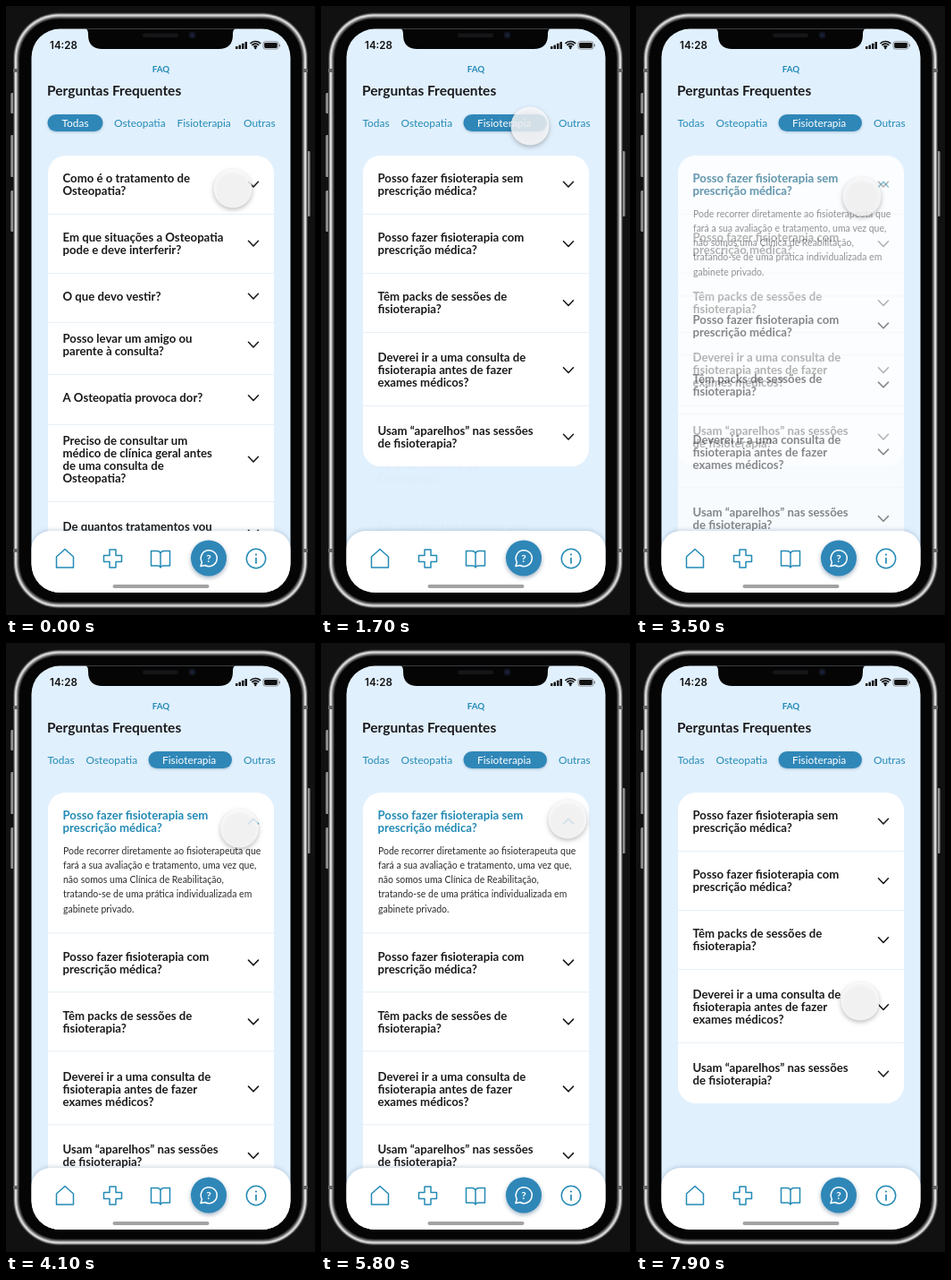
Animation, 346 px wide and 680 px high, one loop 8000 ms. Source, as an HTML page with a canvas:

```html
<!DOCTYPE html>
<html lang="pt">
<head>
<meta charset="utf-8">
<style>
html, body { margin: 0; width: 100%; height: 100%; overflow: hidden; background: #111; }
canvas { display: block; width: 346px; height: 680px; }
</style>
</head>
<body>
<canvas id="stage"></canvas>
<script>
const W = 346, H = 680, LOOP = 8000, FADE = 900;
const TEAL = '#238ab5', BLUE = '#2f87b8', INK = '#1a1a1c', SKY = '#e1f0fd';
const canvas = document.getElementById('stage');
const g = canvas.getContext('2d');
const ratio = window.devicePixelRatio || 1;
canvas.width = W * ratio;
canvas.height = H * ratio;

// Each item: vertical centre of the question, then its lines
const ALL = {
  bottom: 750, dividers: [232, 298, 353, 411, 467, 553],
  items: [
    [199, 'Como é o tratamento de', 'Osteopatia?'],
    [265, 'Em que situações a Osteopatia', 'pode e deve interferir?'],
    [324, 'O que devo vestir?'],
    [378, 'Posso levar um amigo ou', 'parente à consulta?'],
    [437.5, 'A Osteopatia provoca dor?'],
    [506, 'Preciso de consultar um', 'médico de clínica geral antes', 'de uma consulta de', 'Osteopatia?'],
    [588, 'De quantos tratamentos vou', 'precisar?']
  ]
};
const QUESTIONS = [
  ['Posso fazer fisioterapia sem', 'prescrição médica?'],
  ['Posso fazer fisioterapia com', 'prescrição médica?'],
  ['Têm packs de sessões de', 'fisioterapia?'],
  ['Deverei ir a uma consulta de', 'fisioterapia antes de fazer', 'exames médicos?'],
  ['Usam “aparelhos” nas sessões', 'de fisioterapia?']
];
const ANSWER = [
  'Pode recorrer diretamente ao fisioterapeuta que',
  'fará a sua avaliação e tratamento, uma vez que,',
  'não somos uma Clínica de Reabilitação,',
  'tratando-se de uma prática individualizada em',
  'gabinete privado.'
];
const physio = (shift, bottom) => ({
  bottom, open: shift > 0,
  dividers: [232, 298, 364, 446].map(y => y + shift),
  items: [199, 265.5, 331.5, 406.5, 481].map((y, i) => [y + (i ? shift : 0), ...QUESTIONS[i]])
});
const CLOSED = physio(0, 514), OPEN = physio(91.3, 750);

const CHANGES = [
  { at: 815, from: ALL, to: CLOSED },
  { at: 3225, from: CLOSED, to: OPEN },
  { at: 5960, from: OPEN, to: CLOSED }
];
// time, x, y
const POINTER = [
  [0, 254, 204], [800, 234, 134], [1800, 234, 134], [2700, 253, 213],
  [3500, 253, 213], [4900, 276, 197], [6700, 276, 197], [7750, 251, 400], [8000, 251, 400]
];

const lerp = (a, b, t) => a + (b - a) * t;
const clamp = t => Math.max(0, Math.min(1, t));
const easeOut = t => 1 - (1 - t) ** 2;
const easeInOut = t => t < .5 ? 2 * t * t : 1 - 2 * (1 - t) ** 2;

function box(x, y, w, h, r) {
  g.beginPath();
  g.roundRect(x, y, w, h, r);
}
function fillBox(x, y, w, h, r, color) {
  box(x, y, w, h, r);
  g.fillStyle = color;
  g.fill();
}
function strokeBox(x, y, w, h, r, color, width) {
  box(x, y, w, h, r);
  stroke(color, width);
}
function disc(x, y, r, color) {
  g.beginPath();
  g.arc(x, y, r, 0, 7);
  g.fillStyle = color;
  g.fill();
}
function stroke(color, width) {
  g.strokeStyle = color;
  g.lineWidth = width;
  g.stroke();
}
function path(d, x, y, color, width) {
  g.save();
  g.translate(x, y);
  g.lineCap = g.lineJoin = 'round';
  g.strokeStyle = color;
  g.lineWidth = width;
  g.stroke(new Path2D(d));
  g.restore();
}
function text(str, x, y, font, color, align = 'left') {
  g.font = font;
  g.fillStyle = color;
  g.textAlign = align;
  g.fillText(str, x, y);
}
function withAlpha(alpha, draw) {
  if (alpha <= 0) return;
  g.save();
  g.globalAlpha = alpha;
  draw();
  g.restore();
}
function withShadow(color, blur, dy, draw) {
  g.save();
  g.shadowColor = color;
  g.shadowBlur = blur * ratio;
  g.shadowOffsetY = dy * ratio;
  draw();
  g.restore();
}

function drawBody() {
  g.fillStyle = '#111';
  g.fillRect(0, 0, W, H);
  for (const [x, y, h] of [[5, 97, 23], [5, 144, 47], [5, 206, 46], [337, 162, 73]]) {
    const shade = g.createLinearGradient(x, 0, x + 4, 0);
    shade.addColorStop(0, '#555');
    shade.addColorStop(.5, '#aaa');
    shade.addColorStop(1, '#333');
    fillBox(x, y, 4, h, 1.5, shade);
  }
  // Metal rim: dark edge, bright band, then a falloff into the bezel
  const rim = ['#3a3a3a', '#8c8c8c', '#dedede', '#d0d0d0', '#909090', '#585858', '#2c2c2c', '#050505'];
  rim.forEach((color, i) => fillBox(8 + i, 7.5 + i, 330 - 2 * i, 665 - 2 * i, 51 - i, color));
  for (const y of [70, 606]) {
    g.fillStyle = '#666';
    g.fillRect(8, y, 5, 4);
    g.fillRect(333, y, 5, 4);
  }
}

function drawStatus() {
  g.fillStyle = '#050505';
  g.fill(new Path2D('M86 24H260Q254 25 254 31V32Q254 48 238 48H108Q92 48 92 32V31Q92 25 86 24Z'));
  fillBox(153, 30.5, 40, 4.5, 2.3, '#161618');
  disc(208.5, 32.5, 4, '#11141f');
  disc(208.5, 32.5, 1.7, '#1c2440');

  text('14:28', 49, 47.8, '600 11.6px Inter, sans-serif', '#111');
  [3, 4.5, 6.3, 8].forEach((h, i) => fillBox(257 + i * 3.5, 48 - h, 2.5, h, .6, '#111'));
  [2.6, 5.4, 8].forEach(r => {
    g.beginPath();
    g.arc(279.3, 47.5, r, -Math.PI * .76, -Math.PI * .24);
    stroke('#111', 1.7);
  });
  disc(279.3, 47, 1.2, '#111');
  strokeBox(288, 39.7, 17, 8.4, 2.4, '#777', .8);
  fillBox(289.2, 40.9, 14.6, 6, 1.4, '#111');
  fillBox(305.8, 42.4, 1.2, 3, .6, '#777');
}

function drawTabs(p) {
  text('FAQ', 173.5, 73.8, 'bold 9.8px Lato, sans-serif', TEAL, 'center');
  text('Perguntas Frequentes', 46, 100, 'bold 15.5px Lato, sans-serif', INK);
  withShadow('rgba(30,80,120,.3)', 3, 1, () =>
    fillBox(lerp(46.5, 159.5, p), 121, lerp(62, 93.5, p), 19, 9.5, BLUE));
  const label = (str, x, lit) => {
    const font = '11.9px Lato, sans-serif';
    withAlpha(1 - lit, () => text(str, x, 135, font, TEAL));
    withAlpha(lit, () => text(str, x, 135, font, '#fff'));
  };
  label('Todas', lerp(62.5, 46.5, p), 1 - p);
  label('Osteopatia', lerp(121, 89.5, p), 0);
  label('Fisioterapia', lerp(191.5, 175, p), p);
  label('Outras', 266, 0);
}

function drawCard(bottom) {
  fillBox(47, 167, 253, bottom - 167, 20, '#fff');
}

function drawList(list) {
  drawCard(list.bottom);
  g.fillStyle = '#e6eff6';
  for (const y of list.dividers) g.fillRect(47, y, 253, 1);
  list.items.forEach(([cy, ...lines], i) => {
    const active = list.open && i === 0;
    const color = active ? TEAL : INK;
    lines.forEach((line, n) => text(line, 63.5,
      cy + (n - (lines.length - 1) / 2) * 14 + 4.8, 'bold 13.2px Lato, sans-serif', color));
    path(active ? 'M-5.5 3L0 -2.7L5.5 3' : 'M-5.5 -2.7L0 3L5.5 -2.7', 277, cy, color, 1.6);
  });
  if (list.open) ANSWER.forEach((line, n) =>
    text(line, 64, 235.5 + n * 16.3, '10.5px Lato, sans-serif', '#2c2c2e'));
}

function drawLists(time) {
  let current = ALL;
  for (const { at, from, to } of CHANGES) {
    const t = (time - at) / FADE;
    if (t >= 1) current = to;
    else if (t > 0) {
      const p = easeOut(t);
      withAlpha(p, () => drawCard(lerp(from.bottom, to.bottom, p)));
      withAlpha(1 - t, () => drawList(from));
      withAlpha(p, () => drawList(to));
      return;
    }
  }
  drawList(current);
}

function drawNav() {
  withShadow('rgba(60,100,140,.28)', 5, -1, () => fillBox(28, 586, 291, 80, [22, 22, 0, 0], '#fff'));
  path('M-9.5 -2L0 -10.5L9.5 -2V10H-9.5Z', 66, 617, TEAL, 1.5);
  path('M-3.5 -10H3.5V-3.5H10V3.5H3.5V10H-3.5V3.5H-10V-3.5H-3.5Z', 119.5, 617, TEAL, 1.5);
  path('M0 -6Q-1 -8.5 -4 -8.5H-10.5V8H-3.5Q-.5 8 0 10Q.5 8 3.5 8H10.5V-8.5H4Q1 -8.5 0 -6V10', 173, 617, TEAL, 1.5);
  withShadow('rgba(20,60,100,.4)', 5, 2, () => disc(227, 616.5, 20, BLUE));
  path('M-9 9L-7.6 4.6A9 9 0 1 1 -4.2 8Z', 227, 616.5, '#fff', 1.5);
  text('?', 227, 621, 'bold 12px Lato, sans-serif', '#fff', 'center');
  g.beginPath();
  g.arc(280, 617, 10.7, 0, 7);
  stroke(TEAL, 1.5);
  path('M0 -.5V5', 280, 617, TEAL, 1.7);
  disc(280, 612.5, 1.1, TEAL);
  fillBox(119.5, 646, 108, 4, 2, '#a2a2a4');
}

function drawPointer(time) {
  const i = POINTER.findIndex(([at]) => at > time);
  const [t0, x0, y0] = POINTER[i - 1], [t1, x1, y1] = POINTER[i];
  const e = easeInOut((time - t0) / (t1 - t0));
  const x = lerp(x0, x1, e), y = lerp(y0, y1, e);
  withShadow('rgba(0,0,0,.32)', 5, 2, () => disc(x, y, 21.5, 'rgba(254,254,255,.8)'));
}

function draw(time) {
  g.setTransform(ratio, 0, 0, ratio, 0, 0);
  drawBody();
  g.save();
  box(28.5, 25.5, 290, 629.5, 32);
  g.clip();
  g.fillStyle = SKY;
  g.fillRect(0, 0, W, H);
  drawTabs(easeOut(clamp((time - CHANGES[0].at) / FADE)));
  drawLists(time);
  drawNav();
  drawStatus();
  drawPointer(time);
  g.restore();
}

function tick() {
  draw(performance.now() % LOOP);
  requestAnimationFrame(tick);
}
tick();
</script>
</body>
</html>
```
